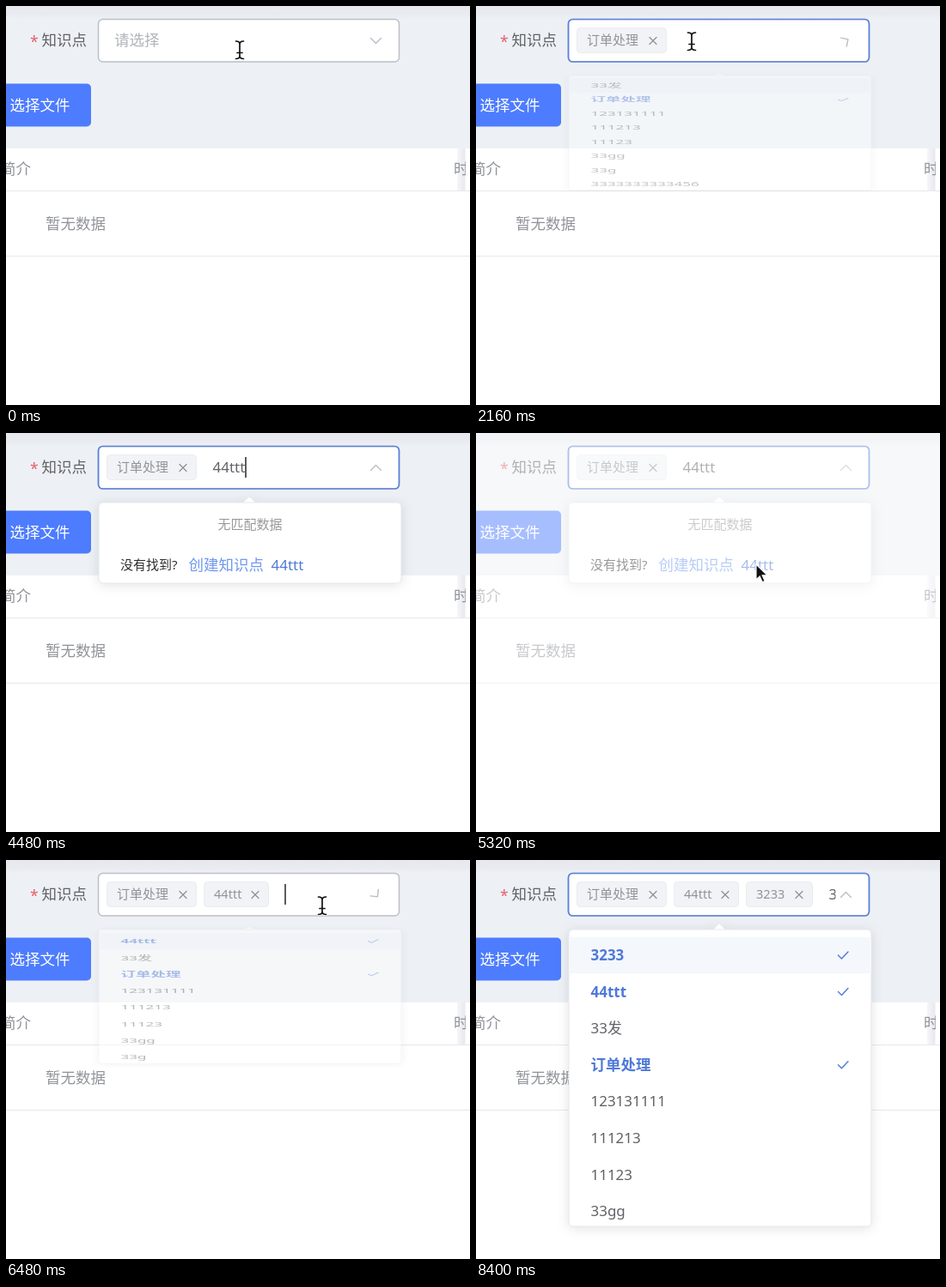
Animation, 540 px wide and 465 px high, one loop 8880 ms. Source, as an HTML page:

```html
<!DOCTYPE html>
<html lang="zh-CN">
<head>
<meta charset="utf-8">
<title>知识点选择</title>
<style>
html, body { margin: 0; width: 100%; height: 100%; overflow: hidden; background: #fff; }
svg { display: block; width: 540px; height: 465px; }
text { font-family: 'Noto Sans', 'Noto Sans CJK SC', 'Noto Sans CJK', sans-serif; white-space: pre; }
.line { fill: none; stroke-linecap: round; stroke-linejoin: round; }
#popup { filter: drop-shadow(0 2px 7px rgba(0, 0, 0, .11)); transform-origin: 284px 81px; }
</style>
</head>
<body>
<svg viewBox="0 0 540 465">
  <defs>
    <linearGradient id="top" x2="0" y2="1">
      <stop offset="0" stop-color="#e7e8ed"/><stop offset=".6" stop-color="#e9ebf0"/><stop offset="1" stop-color="#edf1f5"/>
    </linearGradient>
    <linearGradient id="edge">
      <stop offset="0" stop-color="#f6f6f9"/><stop offset="1" stop-color="#e7e8ee"/>
    </linearGradient>
    <clipPath id="inputClip"><path d="M108 16H418.5V65H108Z"/></clipPath>
    <clipPath id="columnClip"><path d="M500 166H535V215H500Z"/></clipPath>
    <clipPath id="popupClip"><rect id="clipBox" x="108" y="81" width="352" height="346" rx="5"/></clipPath>
  </defs>
  <rect width="540" height="166" fill="#edf1f5"/>
  <rect width="540" height="16" fill="url(#top)"/>
  <g id="page"></g>
  <rect x="107.5" y="15.5" width="350" height="49.5" rx="5" fill="#fff" stroke="#bcc0c7" stroke-width="1.5"/>
  <rect id="focus" x="107.5" y="15.5" width="350" height="49.5" rx="5" fill="none" stroke="#5b83dc" stroke-width="1.7"/>
  <g id="field"></g>
  <path id="chevron" class="line" d="M-6 3L0 -3L6 3" stroke="#b9bdc5" stroke-width="1.4"/>
  <g id="popup">
    <path d="M275 82L283 74.5L291 82Z" fill="#fff"/>
    <rect id="panel" x="108" y="81" width="352" height="346" rx="5" fill="#fff" stroke="#e4e7ed"/>
    <g id="list" clip-path="url(#popupClip)"></g>
  </g>
  <rect id="mask" width="540" height="465" fill="#fff"/>
  <g id="cursor">
    <g id="beam" class="line">
      <path d="M-4.5 -10Q0 -10 0 -6.5Q0 -10 4.5 -10M0 -7V7M-4.5 10.5Q0 10.5 0 7Q0 10.5 4.5 10.5M-3 3.5H3" stroke="#fff" stroke-width="3.4"/>
      <path d="M-4.5 -10Q0 -10 0 -6.5Q0 -10 4.5 -10M0 -7V7M-4.5 10.5Q0 10.5 0 7Q0 10.5 4.5 10.5M-3 3.5H3" stroke="#111" stroke-width="1.7"/>
    </g>
    <path id="arrow" d="M0 0V18L4.2 14L7.2 20.8L10.2 19.5L7.2 12.9H13Z" fill="#111" stroke="#fff" stroke-width="1.2"/>
    <path id="hand" d="M-2 2C-2 -.5 2 -.5 2 2V8C2.5 6 5.5 6 5.8 8.3C6.5 6.8 9 7 9.3 9.3C10.3 8 12.5 8.6 12.6 10.8V14C12.6 17 11 18 10.6 21H1C0 18 -3 16 -5.5 12.5C-7 10 -4.5 8.8 -2 11.5ZM2 8V12M5.8 8.5V12M9.3 9.5V12.5" fill="#fff" stroke="#111" stroke-width="1.4" stroke-linejoin="round"/>
  </g>
</svg>
<script>
const LOOP = 8880, ROW = 42.6, BLUE = '#4f79d8', GREY = '#606266';
const $ = id => document.getElementById(id);
const clamp = v => Math.max(0, Math.min(1, v));
const ramp = (t, from, to) => clamp((t - from) / (to - from));
const easeOut = (p, power) => 1 - (1 - p) ** power;
const lastOf = (list, t) => list.filter(e => e[0] <= t).pop();

const base = ['33发', '订单处理', '123131111', '111213', '11123', '33gg', '33g', '3333333333456', '44'];
const tags = [[1420, '订单处理', 117, 105], [5560, '44ttt', 230, 76], [8020, '3233', 314, 78]];
const typed = [[0, ''], [2880, '4'], [3160, '44'], [3760, '44t'], [4000, '44tt'], [4240, '44ttt'],
  [6200, ''], [6700, '3'], [6800, '32'], [6900, '323'], [7000, '3233']];
const toggles = [[-900, 0], [490, 1], [2109, 0], [2720, 1], [6200, 0], [6447, 1]];
const carets = [[2280, 2560], [2720, 3400], [3680, 4500], [6400, 7080]];
// time, x, y of the pointer; it is hidden between the tracks
const tracks = [
  [[0, 272, 51], [640, 272, 51], [1160, 212, 150], [1480, 212, 150], [2000, 251, 41], [2720, 251, 41]],
  [[4600, 372, 56], [5120, 326, 153], [5640, 326, 153], [6120, 368, 53], [6700, 368, 53]],
  [[7120, 340, 70], [7360, 267, 153], [8020, 267, 153]]
];

function text(x, y, str, size, fill, extra = '') {
  const px = /\d/.test(str) ? size * .97 : size;
  return `<text x="${x}" y="${y}" font-size="${px}" fill="${fill}" ${extra}>${str}</text>`;
}

const cache = {};
function setHtml(id, html) {
  if (cache[id] !== html) $(id).innerHTML = cache[id] = html;
}

function drawPage() {
  setHtml('page',
    text(28, 48, '*', 17.5, '#e4606d') + text(41.5, 46, '知识点', 17.5, GREY) +
    '<rect x="-20" y="90.5" width="119" height="50" rx="5" fill="#4d7cfe"/>' +
    text(4.5, 121.5, '选择文件', 17.5, '#fff', 'font-weight="500"') +
    '<rect y="166" width="540" height="299" fill="#fff"/>' +
    '<rect x="525" y="166" width="9.5" height="49" fill="url(#edge)"/>' +
    text(-6, 196, '简介', 17.5, '#909399', 'font-weight="500"') +
    text(521, 196, '时', 17.5, '#909399', 'font-weight="500" clip-path="url(#columnClip)"') +
    '<path d="M0 215.5H540M0 291.5H540" stroke="#e6e8ec"/>' +
    text(46, 259.5, '暂无数据', 17.5, '#909399'));
}

function drawField(t, chosen, query) {
  let html = '', x = 126;
  for (const [, name, left, width] of chosen) {
    const c = left + width - 16;
    html += `<rect x="${left + .5}" y="25.5" width="${width - 1}" height="29" rx="4" fill="#f1f3f6" stroke="#e9ecf0"/>` +
      text(left + 12, 45, name, 15, '#909399') +
      `<path class="line" d="M${c - 4} 36.5l8 8m0 -8l-8 8" stroke="#8c9096" stroke-width="1.2"/>`;
    x = left + width + 18.5;
  }
  if (!chosen.length) html += text(126, 46, '请选择', 17.5, '#b1b4ba');
  html += text(x, 46, query, 17.5, GREY, 'clip-path="url(#inputClip)"');
  if (carets.some(([a, b]) => t >= a && t < b)) {
    const cx = x + [...query].reduce((w, ch) => w + (ch === 't' ? 6.2 : 9.7), 0) + .5;
    html += `<path d="M${cx} 28V52" stroke="#333" stroke-width="1.6"/>`;
  }
  setHtml('field', html);
}

function drawList(rows, picked, hover, query) {
  let html = '', height = 94;
  if (rows.length) {
    height = Math.min(346, rows.length * ROW + 15.4);
    rows.slice(0, 9).forEach((name, i) => {
      const mid = 111 + i * ROW, on = picked.includes(name);
      if (i === hover) html += `<rect x="108" y="${mid - 21.3}" width="352" height="${ROW}" fill="#f4f7fb"/>`;
      html += text(133.5, mid + 6, name, 17.5, on ? BLUE : GREY, on ? 'font-weight="700"' : '');
      if (on) html += `<path class="line" d="M421.5 ${mid}l4 4l7.5 -8" stroke="${BLUE}" stroke-width="1.4"/>`;
    });
  } else {
    html = text(284, 111.5, '无匹配数据', 15, '#999', 'text-anchor="middle"') +
      text(133, 158.5, '没有找到?', 15, '#303133') +
      text(212.5, 159.5, '创建知识点', 17.5, '#6f98f0') +
      text(308.5, 159.5, query, 17.5, BLUE);
  }
  setHtml('list', html);
  $('panel').setAttribute('height', height);
  $('clipBox').setAttribute('height', height);
}

function pointer(t) {
  const track = tracks.find(k => t >= k[0][0] && t < k[k.length - 1][0]);
  if (!track) return null;
  const i = track.findIndex(p => p[0] > t), a = track[i - 1], b = track[i];
  const p = ramp(t, a[0], b[0]), e = p * p * (3 - 2 * p);
  return { x: a[1] + (b[1] - a[1]) * e, y: a[2] + (b[2] - a[2]) * e };
}

function drawPointer(pos, kind) {
  $('cursor').style.display = pos ? '' : 'none';
  if (!pos) return;
  $('cursor').setAttribute('transform', `translate(${pos.x} ${pos.y})`);
  for (const id of ['beam', 'arrow', 'hand']) $(id).style.display = id === kind ? '' : 'none';
}

function render(t) {
  const chosen = tags.filter(g => t >= g[0]), picked = chosen.map(g => g[1]);
  const query = lastOf(typed, t)[1];
  const reset = (t >= 5560 && t < 6200) || t >= 8020;
  const filter = reset ? '' : query;
  const rows = [...picked.slice(1).reverse(), ...base].filter(n => n.includes(filter));

  const [start, open] = lastOf(toggles, t);
  const p = ramp(t, start, start + 300);
  const grow = easeOut(p, 5), turn = easeOut(p, 2);
  const scale = open ? grow : 1 - grow;
  $('popup').style.display = scale > .004 ? '' : 'none';
  $('popup').style.transform = `scaleY(${scale})`;
  $('popup').style.opacity = scale;
  $('chevron').setAttribute('transform', `translate(430.5 40.5) rotate(${180 * (open ? 1 - turn : turn)})`);
  $('focus').style.opacity = ramp(t, 490, 690) - ramp(t, 6200, 6360) + ramp(t, 6490, 6640);

  const pos = pointer(t);
  const mask = easeOut(ramp(t, 5240, 5480), 2) - ramp(t, 5640, 5920) +
    easeOut(ramp(t, 7680, 7920), 2) - ramp(t, 8040, 8360);
  $('mask').style.opacity = .9 * mask;

  let kind = 'arrow', hover = filter ? -1 : 0;
  if (pos && pos.y < 66) kind = 'beam';
  else if (pos && pos.y > 90 && mask < .05) {
    if (rows.length) {
      kind = 'hand';
      if (!filter) hover = Math.floor((pos.y - 90) / ROW);
    } else if (pos.x > 212 && pos.x < 302) kind = 'hand';
  }
  drawField(t, chosen, query);
  drawList(rows, picked, hover, query);
  drawPointer(pos, kind);
}

drawPage();
const begin = performance.now();
function tick() {
  render((performance.now() - begin) % LOOP);
  requestAnimationFrame(tick);
}
tick();
</script>
</body>
</html>
```
